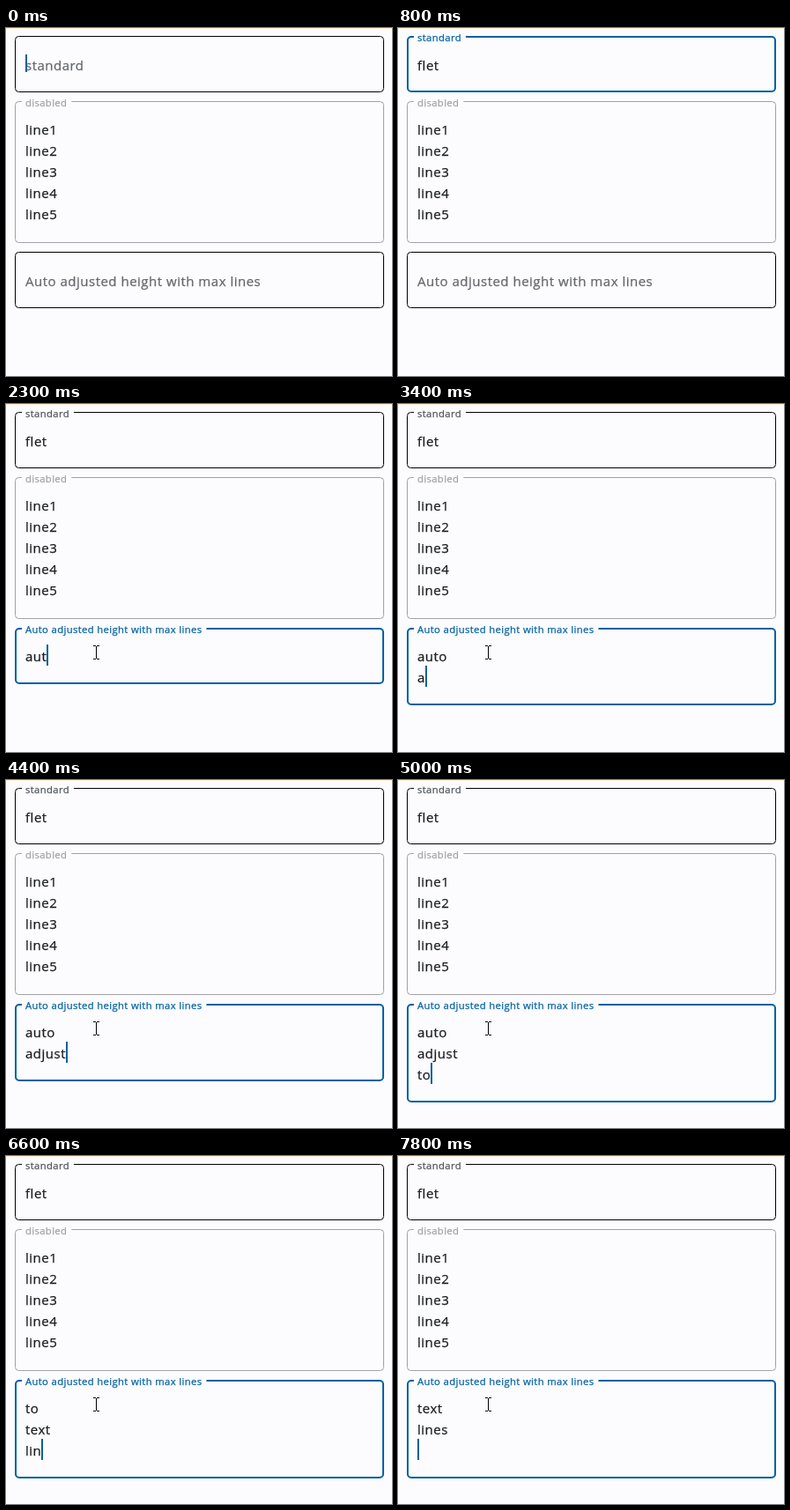
An HTML page with a canvas that plays this animation: 438 px wide and 395 px high, repeating every 7900 ms.

```html
<!DOCTYPE html>
<html lang="en">
<head>
<meta charset="utf-8">
<title>Text fields</title>
<style>
  html, body { margin: 0; width: 100%; height: 100%; overflow: hidden; background: #fcfcff; }
  canvas { display: block; }
</style>
</head>
<body>
<canvas id="stage" width="438" height="395"></canvas>
<script>
const ctx = document.getElementById('stage').getContext('2d');
const LOOP = 7900, STEP = 100, BLINK = 200, LINE = 24, LEFT = 22;
const PAPER = '#fcfcff', INK = '#1a1c1e', BLUE = '#0061a0', HINT = '#64666b',
      LABEL = '#50555d', DISABLED = '#a0a1a5';

// Each typed character with the moment it appears.
const typing = (text, times) => [...text].map((char, i) => ({ char, time: times[i] }));
const nameKeys = typing('flet', [300, 400, 500, 600]);
const noteKeys = typing('auto\nadjust\nto\ntext\nlines\n', [
  1900, 2100, 2300, 2500, 3200,
  3400, 3700, 3900, 4100, 4200, 4400, 4600,
  4800, 5000, 5300,
  5500, 5600, 5800, 5900, 6100,
  6300, 6400, 6600, 6700, 6800, 7000]);

const typedBy = (keys, t) => keys.filter(key => key.time <= t);
const textOf = keys => keys.map(key => key.char).join('');
const blinkOn = (t, since) => Math.floor((t - since) / BLINK) % 2 === 0;
const clamp = v => Math.min(1, Math.max(0, v));

function setFont(scale) {
  ctx.font = `${15 * scale}px "Open Sans", "Noto Sans", sans-serif`;
  ctx.letterSpacing = `${0.5 * scale}px`;
}

function write(text, x, baseline, color, scale = 1) {
  setFont(scale);
  ctx.fillStyle = ctx.strokeStyle = color;
  ctx.lineWidth = 0.25;
  ctx.fillText(text, x, baseline);
  ctx.strokeText(text, x, baseline);
}

function outline(top, height, color, focused) {
  const inset = focused ? 1 : 0.5;
  ctx.strokeStyle = color;
  ctx.lineWidth = focused ? 2 : 1;
  ctx.beginPath();
  ctx.roundRect(10 + inset, top + inset, 419 - 2 * inset, height - 2 * inset, 4);
  ctx.stroke();
}

function floatingLabel(text, top, color) {
  setFont(0.75);
  ctx.fillStyle = PAPER;
  ctx.fillRect(LEFT - 4, top - 1, ctx.measureText(text).width + 9, 4);
  write(text, LEFT, top + 5.5, color, 0.75);
}

function caret(text, top, height) {
  setFont(1);
  ctx.fillStyle = BLUE;
  ctx.fillRect(LEFT + Math.round(ctx.measureText(text).width), top, 2, height);
}

function nameField(t) {
  const keys = typedBy(nameKeys, t), text = textOf(keys);
  const focused = t >= 100 && t < 1200;
  outline(9, 64, focused ? BLUE : '#000', focused);
  if (focused || text) floatingLabel('standard', 9, focused ? BLUE : LABEL);
  else write('standard', LEFT, 48, HINT);
  write(text, LEFT, 48, INK);
  const since = keys.length ? keys.at(-1).time : 0;
  if (t < 1200 && blinkOn(t, since)) caret(text, 30, 20);
}

function disabledField() {
  outline(83, 161, DISABLED, false);
  floatingLabel('disabled', 83, DISABLED);
  for (let i = 0; i < 5; i++) write('line' + (i + 1), LEFT, 121 + i * LINE, INK);
}

function scrollbar(t, keys, lineCount) {
  const since = t - keys.findLast(key => key.char === '\n').time;
  const size = 3 * LINE * 3 / lineCount;
  ctx.globalAlpha = clamp((500 - since) / 200);
  ctx.fillStyle = '#e4e4e7';
  ctx.beginPath();
  ctx.roundRect(407, 345 - size, 8, size, 3);
  ctx.fill();
  ctx.globalAlpha = 1;
}

function noteField(t) {
  const label = 'Auto adjusted height with max lines', top = 254, focusTime = 1700;
  if (t < focusTime) {
    outline(top, 64, '#000', false);
    write(label, LEFT, 293, HINT);
    return;
  }
  const keys = typedBy(noteKeys, t), lines = textOf(keys).split('\n');
  const shown = lines.slice(-3), last = shown.length - 1;
  outline(top, 64 + last * LINE, BLUE, true);
  floatingLabel(label, top, BLUE);
  shown.forEach((line, i) => write(line, LEFT, 292 + i * LINE, INK));
  if (lines.length > 3) scrollbar(t, keys, lines.length);
  const since = keys.length ? keys.at(-1).time : focusTime;
  if (blinkOn(t, since)) caret(shown[last], 273 + last * LINE, LINE);
}

function pointer(t) {
  if (t < 900) return;
  const down = clamp((t - 900) / 600), ease = down * down * (3 - 2 * down);
  const across = clamp((t - 1500) / 200);
  const x = Math.round(60 + 27 * ease + 16 * across) - 1;
  const y = Math.round(12 + 263 * ease + 7 * across);
  ctx.fillStyle = '#000';
  ctx.fillRect(x, y - 7, 1, 14);
  for (const edge of [y - 8, y + 7]) {
    ctx.fillRect(x - 3, edge, 3, 1);
    ctx.fillRect(x + 1, edge, 3, 1);
  }
}

function draw(now) {
  const t = Math.floor(now % LOOP / STEP) * STEP;
  ctx.fillStyle = PAPER;
  ctx.fillRect(0, 0, 438, 395);
  ctx.fillStyle = '#fff1cf';
  ctx.fillRect(0, 0, 438, 1);
  nameField(t);
  disabledField();
  noteField(t);
  pointer(t);
}

const start = performance.now();
function tick() {
  draw(performance.now() - start);
  requestAnimationFrame(tick);
}
tick();
</script>
</body>
</html>
```
